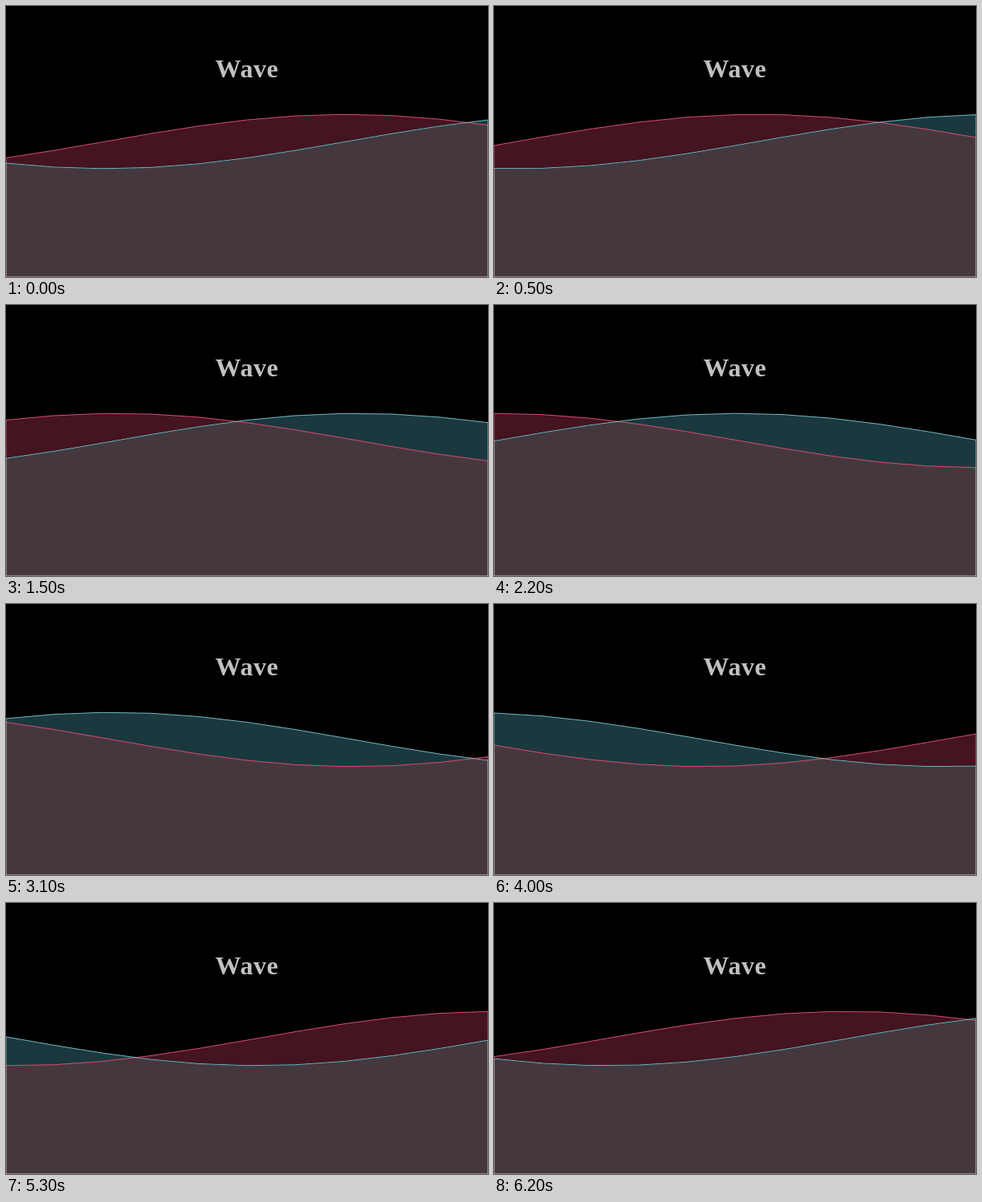
An HTML page with a canvas that plays this animation: 600x338 px, repeating every 6.3 s.

```html
<!DOCTYPE html>
<html lang="en">
<head>
<meta charset="utf-8">
<title>Wave</title>
<style>
  html, body { margin: 0; width: 600px; height: 338px; overflow: hidden; background: #000; }
  canvas { display: block; }
</style>
</head>
<body>
<canvas id="stage" width="600" height="338"></canvas>
<script>
const W = 600, H = 338, SEGMENTS = 10;
const STEP_MS = 100, STEPS = 63, START = -2.22;
const ctx = document.getElementById('stage').getContext('2d');

function drawWave(phase, fill, line) {
  ctx.beginPath();
  ctx.moveTo(0, H);
  for (let i = 0; i <= SEGMENTS; i++) {
    const u = i / SEGMENTS;
    ctx.lineTo(u * W, H * (0.5 - 0.1 * Math.sin(phase + u * Math.PI)));
  }
  ctx.lineTo(W, H);
  ctx.closePath();
  ctx.fillStyle = fill;
  ctx.fill();
  ctx.strokeStyle = line;
  ctx.lineWidth = 1;
  ctx.stroke();
}

function draw(now) {
  const step = Math.floor(now / STEP_MS) % STEPS;
  const phase = START + step * 0.1;

  ctx.globalCompositeOperation = 'source-over';
  ctx.fillStyle = '#000';
  ctx.fillRect(0, 0, W, H);

  ctx.fillStyle = '#c0c0c4';
  ctx.font = 'bold 32px "Liberation Serif", serif';
  ctx.letterSpacing = '0.6px';
  ctx.textAlign = 'center';
  ctx.fillText('Wave', W / 2, 89);

  // Overlapping areas keep the brighter channel of each wave.
  ctx.globalCompositeOperation = 'lighten';
  drawWave(phase, '#1b383e', '#70b8c2');
  drawWave(phase + Math.PI / 2, '#441420', '#d84a70');
}

const startTime = performance.now();
function tick() {
  draw(performance.now() - startTime);
  requestAnimationFrame(tick);
}
tick();
</script>
</body>
</html>
```
